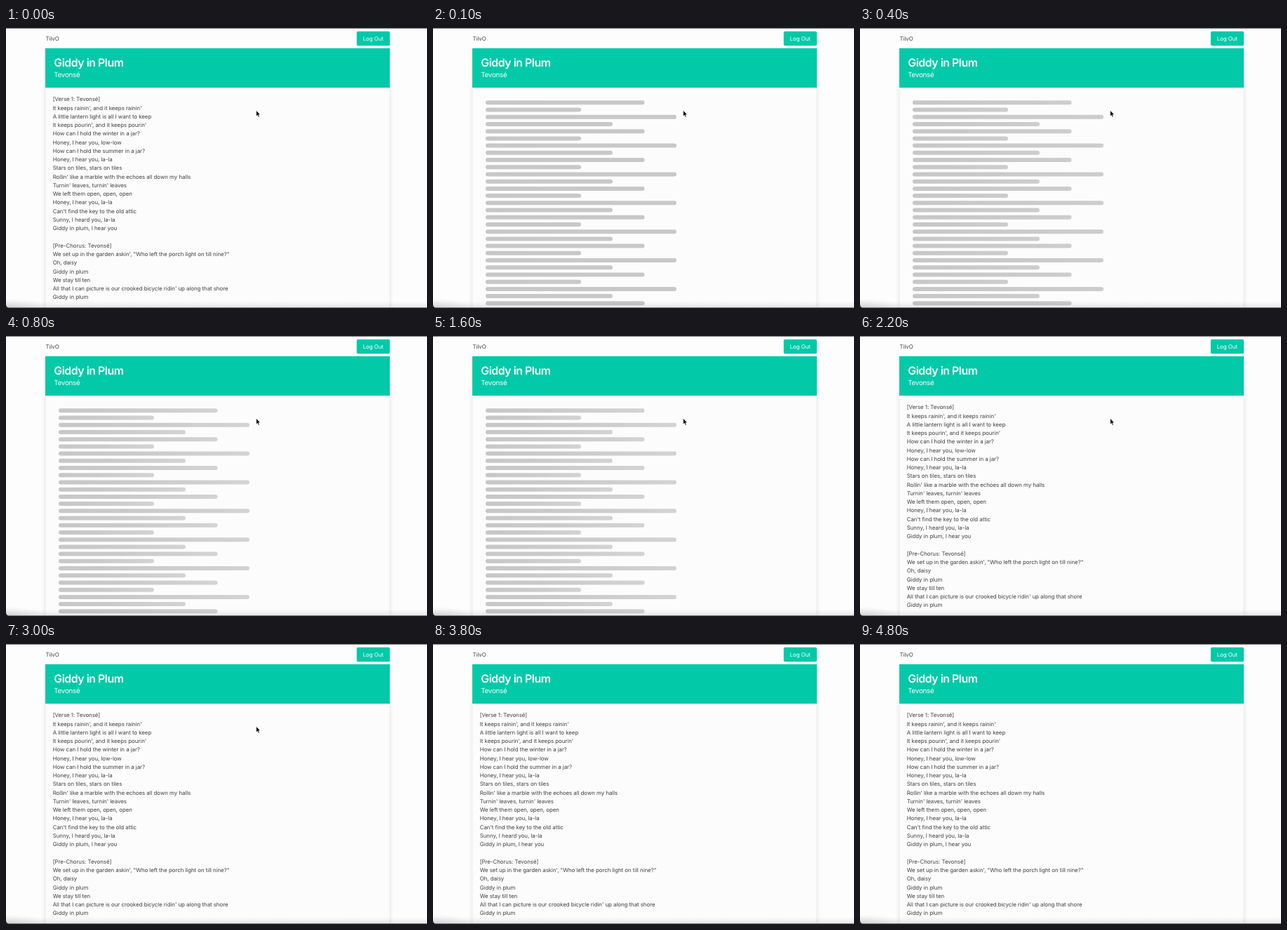
Animation of 600 by 399 pixels, one loop 4900 ms. Source, as an HTML page:

```html
<!DOCTYPE html>
<html lang="en">
<head>
<meta charset="utf-8">
<title>Lyrics</title>
<style>
html, body { margin: 0; width: 100%; height: 100%; overflow: hidden; background: #fdfdfd; }
svg { display: block; width: 600px; height: 399px; }
text {
  font: 7.9px Inter, "Liberation Sans", sans-serif;
  letter-spacing: -.05px;
  text-rendering: geometricPrecision;
  fill: #404040;
}
.panel { fill: #fcfcfc; filter: drop-shadow(0 2px 3px rgba(10, 10, 10, .13)); }
.title { font-size: 15.8px; font-weight: 600; letter-spacing: -.45px; fill: #fff; }
.artist { font-size: 9.9px; letter-spacing: -.3px; fill: #f2fffc; }
.button { fill: #fff; text-anchor: middle; }
</style>
</head>
<body>
<svg viewBox="0 0 600 399">
  <defs>
    <linearGradient id="shimmer">
      <stop offset="0" stop-color="#c7c7c7"/>
      <stop id="middle" offset=".4" stop-color="#c8c8c8"/>
      <stop id="end" offset="1" stop-color="#c8c8c8"/>
    </linearGradient>
    <linearGradient id="edge" x2="0" y2="1">
      <stop offset="0" stop-color="#000" stop-opacity="0"/>
      <stop offset="1" stop-color="#000" stop-opacity=".08"/>
    </linearGradient>
    <radialGradient id="corner">
      <stop offset="0" stop-color="#000" stop-opacity=".1"/>
      <stop offset="1" stop-color="#000" stop-opacity="0"/>
    </radialGradient>
  </defs>
  <rect width="600" height="399" fill="#fdfdfd"/>
  <rect class="panel" x="56.5" y="80" width="490" height="340"/>
  <rect x="56" y="28.8" width="491" height="56.2" fill="#02c9a8"/>
  <rect x="499.8" y="4.8" width="47.2" height="20.4" rx="2" fill="#02c9a8"/>
  <text x="56.5" y="17.9">TilvO</text>
  <text class="button" x="523.3" y="17.9">Log Out</text>
  <text class="title" x="68.3" y="54.8">Giddy in Plum</text>
  <text class="artist" x="68.3" y="70.2">Tevonsé</text>
  <g id="lyrics"></g>
  <g id="bars" fill="url(#shimmer)"></g>
  <path id="cursor" d="M356.7 117.6v8.2l1.8-1.7 1.3 2.9 1.4-.6-1.3-2.8h2.4z" fill="#000" stroke="#fff" stroke-width=".5"/>
  <rect y="389" width="600" height="9" fill="url(#edge)"/>
  <ellipse cy="399" rx="60" ry="14" fill="url(#corner)"/>
  <rect width="600" height="1" fill="#77777b"/>
  <rect y="398" width="600" height="1" fill="#77777b"/>
  <path d="M0 394q.4 4 4 5H0z" fill="#222"/>
</svg>
<script>
const LOOP = 4900, LOAD_START = 100, LOAD_END = 2200;
const lines = `[Verse 1: Tevonsé]
It keeps rainin', and it keeps rainin'
A little lantern light is all I want to keep
It keeps pourin', and it keeps pourin'
How can I hold the winter in a jar?
Honey, I hear you, low-low
How can I hold the summer in a jar?
Honey, I hear you, la-la
Stars on tiles, stars on tiles
Rollin' like a marble with the echoes all down my halls
Turnin' leaves, turnin' leaves
We left them open, open, open
Honey, I hear you, la-la
Can't find the key to the old attic
Sunny, I heard you, la-la
Giddy in plum, I hear you

[Pre-Chorus: Tevonsé]
We set up in the garden askin', "Who left the porch light on till nine?"
Oh, daisy
Giddy in plum
We stay till ten
All that I can picture is our crooked bicycle ridin' up along that shore
Giddy in plum`.split("\n");

const $ = id => document.getElementById(id);

function add(parent, tag, attrs, text = "") {
  const el = document.createElementNS("http://www.w3.org/2000/svg", tag);
  for (const key in attrs) el.setAttribute(key, attrs[key]);
  el.textContent = text;
  parent.append(el);
}

lines.forEach((line, i) => add($("lyrics"), "text", { x: 66.7, y: 104.3 + i * 12.26 }, line));

const widths = [226.5, 136, 272, 181];
for (let i = 0; i < 29; i++)
  add($("bars"), "rect", { x: 75, y: 103.3 + i * 10.215, width: widths[i % 4], height: 6, rx: 3 });

const ramp = (t, from, to) => Math.min(1, Math.max(0, (t - from) / (to - from)));
const gray = v => `rgb(${v},${v},${v})`;

function draw(now) {
  const t = now % LOOP;
  const loading = t >= LOAD_START && t < LOAD_END;
  $("lyrics").style.display = loading ? "none" : "";
  $("bars").style.display = loading ? "" : "none";
  $("cursor").style.opacity = 1 - ramp(t, 3200, 3500);
  const glow = ramp(t, 100, 800);
  $("middle").setAttribute("offset", .4 + .1 * ramp(t, 1600, 2100));
  $("middle").setAttribute("stop-color", gray(200 + 2 * glow));
  $("end").setAttribute("stop-color", gray(200 + 11 * glow));
}

const start = performance.now();
function tick() {
  draw(performance.now() - start);
  requestAnimationFrame(tick);
}
tick();
</script>
</body>
</html>
```
